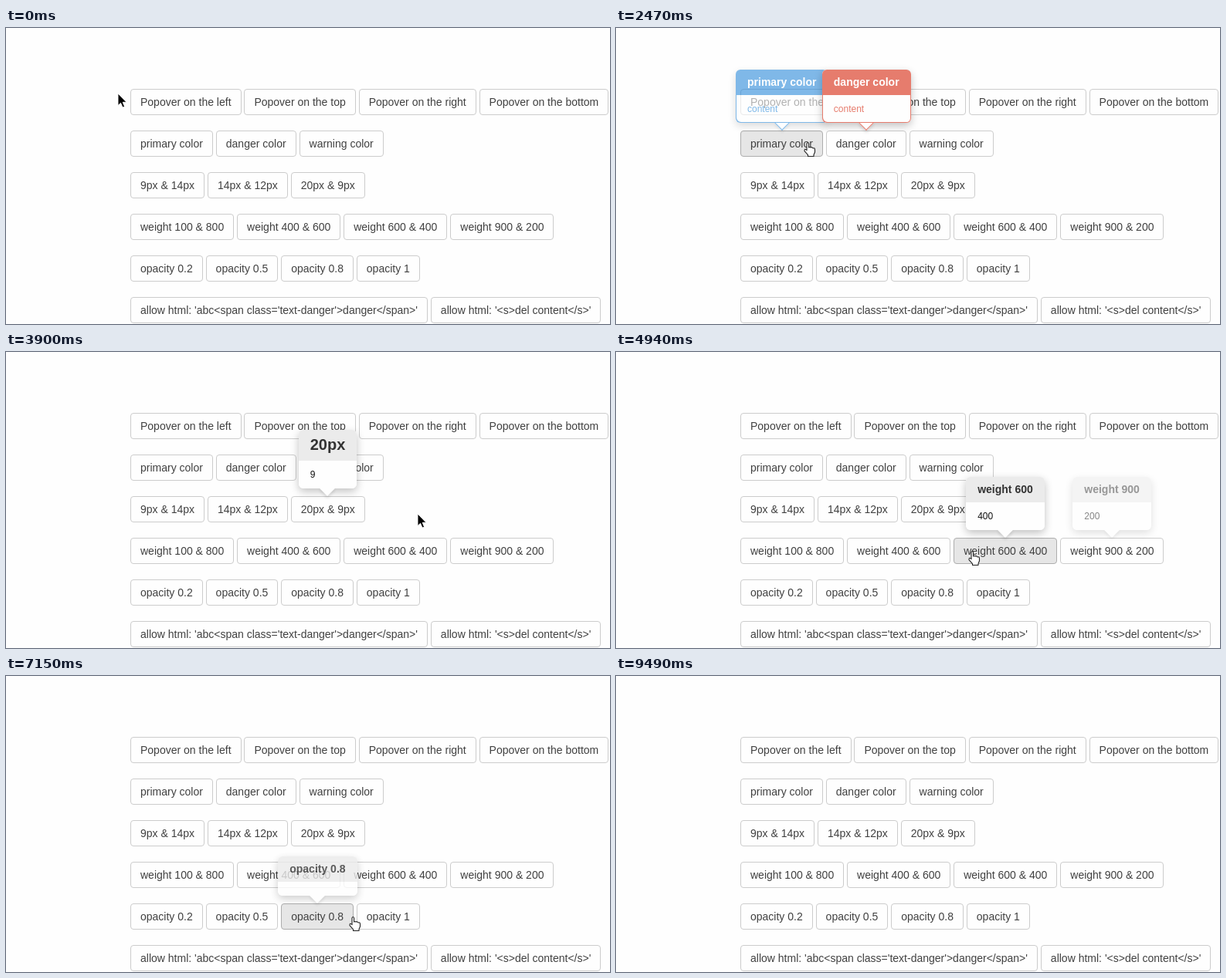
An HTML page for the animation above (9620 ms loop, 782 by 384 pixels).

```html
<!DOCTYPE html>
<html lang="en">
<head>
<meta charset="utf-8">
<title>Popover demo</title>
<style>
html, body { margin: 0; width: 100%; height: 100%; overflow: hidden; background: #fefefe; }
body { position: relative; font: 14px/20px "Liberation Sans", Arial, sans-serif; color: #404040; }
.row { position: absolute; left: 161px; white-space: nowrap; }
.btn {
  position: relative; display: inline-block; box-sizing: border-box; height: 34px;
  padding: 6px 12px; border: 1px solid #ccc; border-radius: 4px; background: #fefefe;
}
.btn.hot { background: #e6e6e6; border-color: #adadad; }
.pop {
  --c: #ebebeb; --edge: transparent; --ink: #111;
  position: absolute; z-index: 10; box-sizing: border-box; width: max-content;
  border-radius: 6px; background: #fefefe; box-shadow: 0 4px 11px rgba(0,0,0,.24);
  color: #333; opacity: 0;
}
.pop.tint { --edge: var(--c); --ink: var(--c); }
.pop.tint .title { color: #fff; }
.title {
  padding: 8px 15px 9px; border-radius: 6px 6px 0 0; background: var(--c);
  font-weight: 700; line-height: 1.15;
}
.body {
  padding: 9px 15px; border-radius: 0 0 6px 6px; background: #fefefe;
  box-shadow: inset 1px -1px var(--edge), inset -1px 0 var(--edge);
  color: var(--ink); font-size: 12px; line-height: 1.5;
}
.pop::before {
  content: ""; position: absolute; z-index: -1; width: 14px; height: 14px; box-sizing: border-box;
  background: #fefefe; transform: rotate(45deg);
}
.top::before, .bottom::before { left: calc(50% - 7px); }
.left::before, .right::before { top: calc(50% - 7px); }
.top::before {
  bottom: -7px; border: 1px solid;
  border-color: transparent var(--edge) var(--edge) transparent;
  box-shadow: 2px 2px 4px rgba(0,0,0,.12);
}
.bottom::before { top: -7px; }
.left::before { right: -7px; }
.right::before { left: -7px; }
.red { color: #e67c6d; }
#cursor { position: absolute; left: 0; top: 0; z-index: 20; overflow: visible; }
</style>
</head>
<body>
<svg id="cursor" width="20" height="22">
  <path id="arrow" d="M0 0V15.5L3.5 12.3L6 18L8.6 17L6.2 11.3H11Z" fill="#000" stroke="#fff" stroke-width=".9"/>
  <path id="hand" transform="translate(-5 0)" fill="#fff" stroke="#222" stroke-width="1.1" stroke-linejoin="round"
    d="M4 2Q5.3-1 6.6 2V7Q8 6 9 7Q10.5 6 12 8Q14.5 7 14.5 10V13L13 16.5V18.5H5.5V16.6L1 11.6Q1 7.5 4 10.7Z"/>
</svg>
<script>
const STEP = 130, COUNT = 74;

const side = place => ({ text: `Popover on the ${place}`, place });
const tint = (name, c) => ({ text: `${name} color`, c });
const pair = (a, b, unit, css) => ({ title: unit(a), body: String(b), head: css(a), main: css(b) });
const size = (a, b) => ({
  text: `${a}px & ${b}px`,
  ...pair(a, b, v => `${v}px`, v => `font-size:${Math.max(v, 12)}px`)
});
const weight = (a, b) => ({
  text: `weight ${a} & ${b}`,
  ...pair(a, b, v => `weight ${v}`, v => `font-weight:${v}`)
});
const fade = alpha => ({ text: `opacity ${alpha}`, body: '', alpha });
const markup = (code, body = code) => ({ text: `allow html: '${code}'`, title: 'allow html', body });

const rows = [
  ['left', 'top', 'right', 'bottom'].map(side),
  [tint('primary', '#2b8bdb'), tint('danger', '#e67c6d'), tint('warning', '#eda849')],
  [size(9, 14), size(14, 12), size(20, 9)],
  [weight(100, 800), weight(400, 600), weight(600, 400), weight(900, 200)],
  [0.2, 0.5, 0.8, 1].map(fade),
  [markup("abc<span class='text-danger'>danger</span>", 'abc<span class="red">danger</span>'),
   markup('<s>del content</s>')]
];

// the pointer sweeps each row in turn: time, x, y at the turning points
const path = [
  [0, 145, 85], [900, 640, 99], [1300, 666, 99],
  [1650, 490, 150], [2470, 248, 148],
  [2900, 215, 204], [3900, 533, 210],
  [4420, 645, 258], [5500, 262, 259], [5850, 238, 260],
  [6120, 205, 312], [7150, 449, 312], [7410, 494, 312],
  [7930, 430, 367], [8710, 640, 368], [9620, 740, 460]
];

function pointer(t) {
  const i = path.findIndex(k => k[0] > t);
  const [t0, x0, y0] = path[i - 1], [t1, x1, y1] = path[i];
  const f = (t - t0) / (t1 - t0);
  return [x0 + (x1 - x0) * f, y0 + (y1 - y0) * f];
}

function add(parent, cls, css = '') {
  const el = parent.appendChild(document.createElement('div'));
  el.className = cls;
  el.style.cssText = css;
  return el;
}

function position(pop, btn, where) {
  const w = pop.offsetWidth, h = pop.offsetHeight, bw = btn.offsetWidth, bh = btn.offsetHeight;
  const midX = Math.round((bw - w) / 2), midY = Math.round((bh - h) / 2);
  const [x, y] = {
    top: [midX, -h - 10], bottom: [midX, bh + 10], left: [-w - 10, midY], right: [bw + 10, midY]
  }[where];
  // offsets start inside the button's border
  pop.style.left = x - 1 + 'px';
  pop.style.top = y - 1 + 'px';
}

function build(row, o) {
  const btn = add(row, 'btn');
  btn.textContent = o.text;
  row.append(' ');
  const where = o.place || 'top';
  const pop = add(btn, `pop ${where}${o.c ? ' tint' : ''}`, o.c ? `--c:${o.c}` : '');
  add(pop, 'title', o.head).textContent = o.title || o.text;
  add(pop, 'body', o.main).innerHTML = o.body ?? 'content';
  position(pop, btn, where);

  const box = btn.getBoundingClientRect();
  const hits = Array.from({ length: COUNT }, (_, n) => {
    const [x, y] = pointer(n * STEP);
    return x >= box.left && x <= box.right && y >= box.top && y <= box.bottom;
  });
  return { btn, pop, hits, alpha: o.alpha || 1 };
}

const items = rows.flatMap((list, r) => {
  const row = add(document.body, 'row', `top:${79 + 54 * r}px`);
  return list.map(o => build(row, o));
});

// quick fade in, a short hold after leaving, then fade out
function visibility(hits, n) {
  if (hits[n]) return hits[n - 1] ? 1 : 0.6;
  const last = hits.lastIndexOf(true, n);
  return last < 0 ? 0 : Math.max(0, Math.min(1, (4 - n + last) / 2));
}

const cursor = document.getElementById('cursor');
const arrow = document.getElementById('arrow'), hand = document.getElementById('hand');

function draw(n) {
  for (const { btn, pop, hits, alpha } of items) {
    btn.classList.toggle('hot', hits[n]);
    pop.style.opacity = visibility(hits, n) * alpha;
  }
  const over = items.some(it => it.hits[n]);
  const [x, y] = pointer(n * STEP).map(Math.round);
  cursor.style.transform = `translate(${x}px,${y}px)`;
  arrow.style.display = over ? 'none' : '';
  hand.style.display = over ? '' : 'none';
}

const start = performance.now();
function tick() {
  draw(Math.floor((performance.now() - start) / STEP) % COUNT);
  requestAnimationFrame(tick);
}
tick();
</script>
</body>
</html>
```
